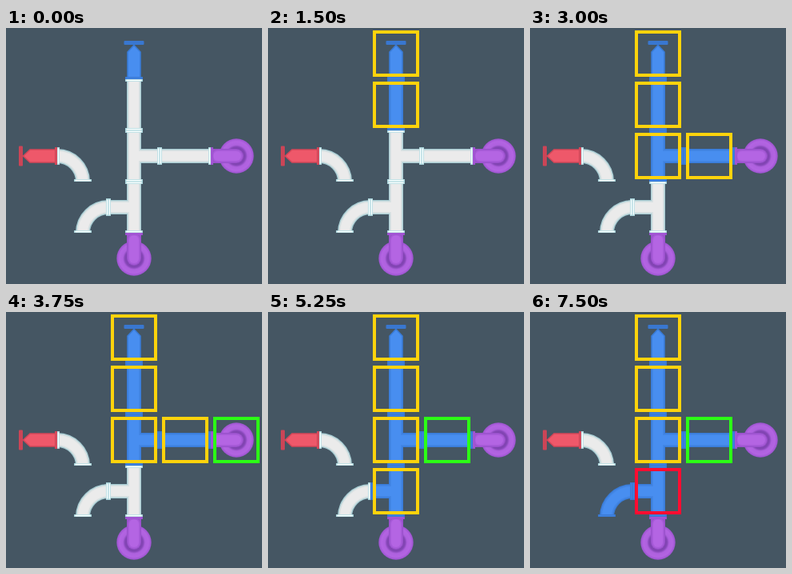
Animation, 320 px wide and 320 px high, one loop 8 s. Source, as an HTML page:

```html
<!DOCTYPE html>
<html lang="en">
<head>
<meta charset="utf-8">
<title>Pipe search</title>
<style>
  html, body { margin: 0; width: 100%; height: 100%; overflow: hidden; background: #455663; }
  svg { display: block; width: 100vw; height: 100vh; }
  .empty { --edge: #a5cbd2; --side: #d9e2e3; --core: #ebebeb; --rim: #a9d3da; --lip: #f8ffff; }
  .blue { --edge: #397bd6; --side: #4286e6; --core: #488ef0; --rim: #3977d0; --lip: #3f83e0; }
  .red { --edge: #d34758; --side: #e55163; --core: #ee586a; --rim: #cb4557; --lip: #dc4d5f; }
  .purple { --edge: #9850ca; --side: #a85bd9; --core: #b465e3; --rim: #9850ca; --lip: #a758d8; }
  .edge { stroke: var(--edge); }
  .side { stroke: var(--side); }
  .core { stroke: var(--core); }
  .pipe { fill: none; }
  .rim { fill: var(--rim); }
  .lip { fill: var(--lip); }
  .mark { fill: none; stroke-width: 4; }
</style>
</head>
<body>
<svg viewBox="0 0 320 320">
  <defs>
    <radialGradient id="ring">
      <stop offset=".38" stop-color="#7d42ad"/>
      <stop offset=".52" stop-color="#8446b6"/>
      <stop offset=".64" stop-color="#ae61de"/>
      <stop offset=".84" stop-color="#b364e2"/>
      <stop offset="1" stop-color="#9c53cf"/>
    </radialGradient>
  </defs>
  <g id="tiles"></g>
  <g id="marks"></g>
</svg>
<script>
const STEP = 750, LOOP = 8000, CELL = 64;
const YELLOW = '#ffd30c', GREEN = '#2cff16', RED = '#ff0d31';

// Tiles are drawn around their own centre; angles turn the top edge clockwise.
const flange = angle => `<g transform="rotate(${angle})">
  <rect class="rim" x="-11" y="-32" width="22" height="3"/>
  <rect class="lip" x="-9.5" y="-31.4" width="19" height="1.7"/></g>`;

const pipe = (path, cap = 'butt') => [['edge', 18], ['side', 15.5], ['core', 12]]
  .map(([layer, width]) =>
    `<path class="pipe ${layer}" d="${path}" stroke-width="${width}" stroke-linecap="${cap}"/>`).join('');

const shapes = {
  straight: pipe('M0-32V32') + flange(0) + flange(180),
  tee: pipe('M0-32V32M0 0H32') + flange(0) + flange(90) + flange(180),
  elbow: pipe('M-32 0A32 32 0 0 1 0 32') + flange(180) + flange(270),
  tap: `<rect class="rim" x="-12.5" y="-16" width="25" height="5" rx="1"/>
    <path class="edge" d="M0-10.5L8-2V32H-8V-2Z" fill="var(--core)" stroke-width="1.6"/>` + flange(180),
  drain: '<circle r="21.7" fill="url(#ring)"/>' + pipe('M0-32V-23') + pipe('M0-23V0', 'round') + flange(0)
};

// shape, column, row, rotation, colour, step at which water arrives
const tiles = [
  ['tap', 2, 0, 0, 'blue'],
  ['tap', 0, 2, 270, 'red'],
  ['drain', 4, 2, 270, 'purple'],
  ['drain', 2, 4, 0, 'purple'],
  ['elbow', 1, 2, 0, 'empty'],
  ['straight', 2, 1, 0, 'empty', 2],
  ['tee', 2, 2, 0, 'empty', 3],
  ['straight', 3, 2, 90, 'empty', 4],
  ['tee', 2, 3, 180, 'empty', 7],
  ['elbow', 1, 3, 270, 'empty', 9]
];

// column, row, then the colour taken at each step
const marks = [
  [2, 0, { 1: YELLOW }],
  [2, 1, { 2: YELLOW }],
  [2, 2, { 3: YELLOW }],
  [3, 2, { 4: YELLOW, 6: GREEN }],
  [4, 2, { 5: GREEN, 6: 'none' }],
  [2, 3, { 7: YELLOW, 10: RED }],
  [2, 4, { 8: GREEN, 10: 'none' }],
  [1, 3, { 9: RED, 10: 'none' }]
];

const centre = n => n * CELL + CELL / 2;
const tileLayer = document.getElementById('tiles');
const markLayer = document.getElementById('marks');

tileLayer.innerHTML = tiles.map(([shape, col, row, turn, colour]) =>
  `<g class="${colour}" transform="translate(${centre(col)} ${centre(row)}) rotate(${turn})">${shapes[shape]}</g>`).join('');
markLayer.innerHTML = marks.map(([col, row]) =>
  `<rect class="mark" x="${centre(col) - 27}" y="${centre(row) - 27}" width="54" height="54"/>`).join('');

function show(step) {
  tiles.forEach(([, , , , colour, wetAt], i) =>
    tileLayer.children[i].setAttribute('class', step >= wetAt ? 'blue' : colour));
  marks.forEach(([, , colours], i) => {
    const latest = Object.keys(colours).filter(key => key <= step).pop();
    markLayer.children[i].setAttribute('stroke', colours[latest] || 'none');
  });
}

const start = performance.now();
let shown = 0;
function tick() {
  const step = Math.floor((performance.now() - start) % LOOP / STEP);
  if (step !== shown) show(shown = step);
  requestAnimationFrame(tick);
}
show(0);
requestAnimationFrame(tick);
</script>
</body>
</html>
```
